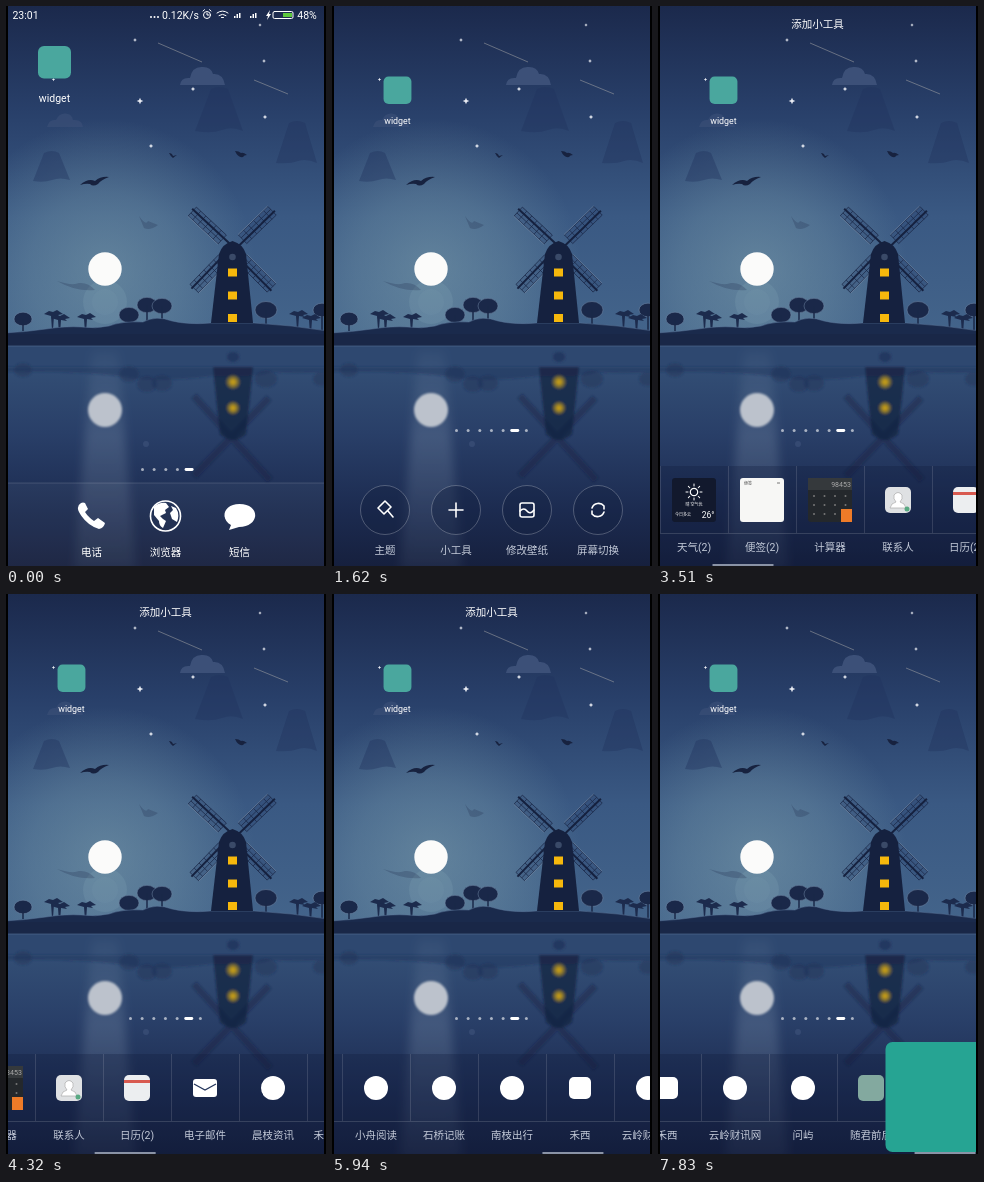
Animation, 320 px wide and 560 px high, one loop 8000 ms. Source, as an HTML page:

```html
<!DOCTYPE html>
<html lang="zh">
<head>
<meta charset="utf-8">
<style>
html, body { margin: 0; width: 100%; height: 100%; overflow: hidden; background: #000 }
svg { display: block; width: 320px; height: 560px }
text { font: 10.5px Roboto, "Noto Sans CJK SC", "Noto Sans CJK", sans-serif; fill: #fff; text-anchor: middle }
.line { fill: none; stroke: #fff; stroke-width: 1.6; stroke-linecap: round; stroke-linejoin: round }
.dim text { fill: #c3cad8 }
</style>
</head>
<body>
<svg viewBox="0 0 320 560">
<defs>
  <linearGradient id="sky" x2="0" y2="1">
    <stop offset="0" stop-color="#1b294c"/><stop offset=".3" stop-color="#283f69"/>
    <stop offset=".62" stop-color="#3a5983"/><stop offset="1" stop-color="#44658b"/>
  </linearGradient>
  <radialGradient id="glow">
    <stop offset="0" stop-color="#86a8b2" stop-opacity=".5"/><stop offset=".5" stop-color="#7fa2b0" stop-opacity=".32"/>
    <stop offset="1" stop-color="#7fa2b0" stop-opacity="0"/>
  </radialGradient>
  <linearGradient id="water" x2="0" y2="1">
    <stop offset="0" stop-color="#365379"/><stop offset=".4" stop-color="#293f68"/>
    <stop offset=".75" stop-color="#1c2b50"/><stop offset="1" stop-color="#16203e"/>
  </linearGradient>
  <linearGradient id="beam" x2="0" y2="1">
    <stop offset="0" stop-color="#8fa3bb" stop-opacity=".06"/><stop offset=".4" stop-color="#8fa3bb" stop-opacity=".25"/>
    <stop offset="1" stop-color="#8fa3bb" stop-opacity=".08"/>
  </linearGradient>
  <radialGradient id="lamp">
    <stop offset=".25" stop-color="#c09a1c"/><stop offset="1" stop-color="#a68a2c" stop-opacity=".3"/>
  </radialGradient>
  <filter id="soft" x="-30%" y="-30%" width="160%" height="160%"><feGaussianBlur stdDeviation="1.2"/></filter>
  <filter id="blur" x="-30%" y="-30%" width="160%" height="160%"><feGaussianBlur stdDeviation="5"/></filter>
  <clipPath id="stage"><path d="M2 0H318V560H2z"/></clipPath>
</defs>
<g clip-path="url(#stage)">
  <path fill="url(#sky)" d="M0 0H320V340H0z"/>
  <circle cx="99" cy="263" r="150" fill="url(#glow)"/>
  <g fill="#86a8b8"><circle cx="99" cy="296" r="22" opacity=".2"/><circle cx="99" cy="296" r="13" opacity=".1"/></g>
  <g fill="#21335e" opacity=".4">
    <path d="M205 83Q213 79 222 83L237 125Q226 120 216 124T189 125z"/>
    <path d="M283 117Q291 113 299 117L311 157Q300 152 292 155T270 157z"/>
    <path d="M38 147Q46 143 53 147L64 174Q54 171 46 174T27 175z"/>
  </g>
  <g fill="#3c5078">
    <path d="M174 79Q175 71 184 72Q186 60 197 61Q205 61 207 68Q217 67 219 79z"/>
    <path opacity=".6" d="M41 121Q43 113 50 114Q54 106 62 108Q66 109 67 114Q76 113 77 121z"/>
  </g>
  <path stroke="#a9a9a9" stroke-width=".8" opacity=".65" d="M152 37L196 56M248 74L282 88"/>
  <g id="stars" fill="#e8ebf2"></g>
  <g fill="#17223f">
    <path d="M74 179Q82 172 89 175Q95 170 103 171Q95 174 92 178Q87 181 84 178Q80 177 74 179z"/>
    <path d="M229 145Q233 145 235 147Q237 146 241 149Q238 149 237 151Q232 152 229 145z"/>
    <path d="M163 147Q166 147 167 150L171 149Q168 151 167 152Q165 151 163 147z"/>
    <path opacity=".22" d="M51 275Q66 280 73 277Q82 276 89 284Q70 286 51 275zM133 210Q140 220 142 215L152 219Q144 225 138 222z"/>
  </g>
  <circle cx="99" cy="263" r="16.7" fill="#fbfbfa"/>

  <path fill="url(#water)" d="M0 339H320V560H0z"/>
  <path fill="#2e4870" d="M0 339H320V361H0z"/>
  <path fill="url(#beam)" d="M86 345H112L130 565H68z" filter="url(#blur)"/>
  <g id="mirror" filter="url(#soft)">
    <path fill="#1f3157" opacity=".4" d="M0 361H320V366Q292 368 265 366Q250 372 205 370Q150 377 120 371Q80 365 0 366z"/>
  </g>
  <circle cx="99" cy="404" r="17" fill="#bcc2cc" filter="url(#soft)"/>
  <circle cx="140" cy="438" r="3" fill="#4a5f88" opacity=".4"/>

  <g id="trees"></g>
  <path fill="#1a2a4c" stroke="#5b7498" stroke-width=".5" d="M-2 340V327Q20 326 40 323Q60 320 75 321Q90 323 103 320Q116 315 137 316Q150 309 166 315Q183 319 205 317H248Q285 319 322 325V340z"/>
  <path fill="#17233f" d="M0 328H320V339H0z" opacity=".4"/>
  <g id="blades"></g>
  <path fill="#15213f" d="M205 317L213 248Q216 238 226.500 235Q237 238 240 248L247 317z"/>
  <circle cx="226.500" cy="251" r="3.300" fill="#3a4a68"/>
  <g fill="#f6b80c"><path d="M222 262.500h9v8h-9zM222 285.500h9v8h-9zM222 308h9v8h-9z"/></g>

  <g id="app">
    <rect x="32" y="40" width="33" height="32.500" rx="6" fill="#4aa79e"/>
    <text x="48.500" y="96">widget</text>
  </g>
  <g id="dots" fill="#fff"></g>

  <g id="home">
    <path fill="#fff" opacity=".04" d="M0 477H320V560H0z"/>
    <path stroke="#fff" stroke-width=".7" opacity=".2" d="M0 477H320"/>
    <g id="status">
      <text x="19.500" y="12.500">23:01</text><text x="174.500" y="12.500">0.12K/s</text><text x="301" y="12.500">48%</text>
      <g fill="#fff"><circle cx="145" cy="11" r="1"/><circle cx="148.500" cy="11" r="1"/><circle cx="152" cy="11" r="1"/>
        <path d="M228 12v-2h1.500v2zM230.500 12v-4H232v4zM233 12v-5h1.500v5zM244 12v-2h1.500v2zM246.500 12v-4H248v4zM249 12v-5h1.500v5zM264 4l-4 6h2l-1 4 4-6h-2z"/></g>
      <g class="line" style="stroke-width:1"><circle cx="201" cy="9" r="3.500"/><path d="M201 7v2h2M197 5l1.500-1.300M205 5l-1.500-1.300M211 7q5.500-4 11 0M213 9.500q3.500-2.500 7 0M215.500 11.500h2"/><rect x="267" y="5.500" width="20" height="7" rx="1.500"/></g>
      <path fill="#5cc83c" d="M277 7h9v4h-9z"/>
    </g>
    <path fill="#fff" d="M75 497Q70 500 73 506Q80 519 93 523Q98 522 99 517L92 512L88 515Q82 511 79 506L82 503L79 497Q77 496 75 497z"/>
    <circle cx="159.500" cy="510" r="15" class="line"/>
    <path fill="#fff" d="M148 501Q153 496 160 497L163 501L159 504L160 507L154 510L157 513L160 515L157 522Q153 520 153 515L148 509zM165 500L170 502Q174 508 171 516L166 513L164 507L167 504z"/>
    <path fill="#fff" d="M233.500 498C255 498 254 521 233 521L223 524L225 519C214 513 217 498 233.500 498z"/>
    <text x="85.500" y="550">电话</text><text x="159.500" y="550">浏览器</text><text x="233.500" y="550">短信</text>
  </g>

  <g id="edit" class="dim">
    <g id="rings" fill="#14204060" stroke="#fff" stroke-opacity=".3" stroke-width=".8"></g>
    <g class="line">
      <path d="M46 502L53 495L59 501L52 508zM56 505L61 511M124 497v14M117 504h14"/>
      <rect x="188" y="497" width="14" height="14" rx="2"/><path d="M188 505q4-4 7 0t7-1"/>
      <path d="M260 502A7 7 0 0 1 272 500M272 506A7 7 0 0 1 260 508M272 500v3M260 508v-3"/>
    </g>
    <text x="53" y="548">主题</text><text x="124" y="548">小工具</text><text x="195" y="548">修改壁纸</text><text x="266" y="548">屏幕切换</text>
  </g>

  <g id="panel">
    <path fill="#101c3c" opacity=".28" d="M0 460H320V560H0z"/>
    <g id="list" class="dim"></g>
    <path stroke="#fff" stroke-width=".7" opacity=".2" d="M0 527.500H320"/>
    <rect id="bar" y="558" width="61" height="2" fill="#8a93a6"/>
  </g>
  <text id="title" x="159.500" y="22" font-weight="500">添加小工具</text>
  <rect id="held" x="-55" y="-55" width="110" height="110" rx="7" fill="#26a493"/>
</g>
</svg>
<script>
const $ = id => document.getElementById(id);
const add = (id, html) => $(id).insertAdjacentHTML('beforeend', html);
const clamp = x => Math.max(0, Math.min(1, x));
const ease = (t, from, to) => { const x = clamp((t - from) / (to - from)); return x * x * (3 - 2 * x); };

// Scenery
for (const [x, y, r] of [[129,34,2], [134,95,3.3], [187,83,2.2], [145,140,2.2], [254,19,1.7], [258,55,2], [259,111,2.2], [47.5,73.5,1.8]])
  add('stars', `<path d="M${x} ${y - r}l${r * .3} ${r * .7} ${r * .7} ${r * .3} ${-r * .7} ${r * .3} ${-r * .3} ${r * .7} ${-r * .3} ${-r * .7} ${-r * .7} ${-r * .3} ${r * .7} ${-r * .3}z"/>`);

for (const [x, y, r] of [[123,309,9], [141,299,9], [156,300,9], [260,304,10], [17,313,8], [316,304,8]]) {
  const crown = cy => `<ellipse cx="${x}" cy="${cy}" rx="${r + 1}" ry="${r * .85}"/>`;
  add('trees', `<g fill="#1a2849" stroke="#7289a6" stroke-width=".5">${crown(y)}<path stroke="#1a2849" stroke-width="1.5" d="M${x} ${y}V325"/></g>`);
  add('mirror', `<g fill="#1f3157" opacity=".45">${crown(677 - y)}</g>`);
}
for (const [x, y] of [[47,308], [80,311], [292,308], [305,312], [54,312]])
  add('trees', `<path fill="#1c2b4d" d="M${x - 9} ${y}l5-3 4 1 4-2 6 4-5 1 2 2-6-1-1 14h-1l-1-14z"/>`);

const blade = a => {
  let d = 'M14-6H55V6H14zM14-2H55';
  for (let x = 21; x < 55; x += 7) d += `M${x}-6V6`;
  return `<g transform="translate(226.500 243) rotate(${a})"><path fill="#263a63" fill-opacity=".2" stroke="#1a2746" stroke-width=".7" d="${d}"/><path stroke="#15213f" stroke-width="2" d="M0 2H57"/><path stroke="#8296b0" stroke-width=".5" d="M14-6.500H55"/></g>`;
};
for (const a of [-44, 45, 134, 223]) add('blades', blade(a));
add('mirror', `<path fill="#15213f" opacity=".7" d="M207 361H247L240 428Q227 440 214 428z"/>
  <path stroke="#15213f" stroke-width="7" opacity=".35" d="M188 390L264 474M263 392L188 470"/>
  <ellipse cx="227" cy="351" rx="6" ry="5" fill="#243860"/>
  <circle cx="227" cy="376" r="7" fill="url(#lamp)"/><circle cx="227" cy="402" r="6.500" fill="url(#lamp)"/>`);
for (const x of [53, 124, 195, 266]) add('rings', `<circle cx="${x}" cy="504" r="24.500"/>`);

// Widget list; each icon is drawn around its own centre
const tile = (w, fill, more = '') => `<rect x="${-w / 2}" y="${-w / 2}" width="${w}" height="${w}" rx="${w > 30 ? 3 : 5}" fill="${fill}"/>` + more;
const label = (x, y, size, s, fill = '#fff') => `<text x="${x}" y="${y}" style="font-size:${size}px;fill:${fill}">${s}</text>`;
const stroke = (d, w = 1.6) => `<path class="line" style="stroke-width:${w}" d="${d}"/>`;
const disc = '<circle r="12" fill="#fff"/>';
const glass = '#7f8798';
let keys = '';
for (let i = 0; i < 12; i++) keys += `<circle cx="${-16 + i % 4 * 10.5}" cy="${-4 + (i >> 2) * 9}" r="1" fill="#777"/>`;
const rays = [...Array(8)].map((_, i) => `<path class="line" style="stroke-width:1" transform="rotate(${i * 45})" d="M6 0h2"/>`).join('');

const items = [
  ['开关(18)', tile(26, glass, '<path fill="#fff" d="M0-7L1.500-2L7 1V3L1.500 1L1 5L3 7H-3L-1 5L-1.500 1L-7 3V1L-1.500-2z"/>')],
  ['设置(12)', tile(26, glass, stroke('M-8-2Q0-9 8-2M-5 1Q0-4 5 1M-2.500 4Q0 2 2.500 4M0 6v.1'))],
  ['一键清理', tile(39, '#626b80', '<circle r="13" fill="#4c5a6c" stroke="#8fae9e"/>' + stroke('M-4-4L4 4M4-4L-4 4', 1.3))],
  ['时钟(4)', '<rect x="-20" y="-15" width="41" height="30" fill="#17223f"/><text y="6" style="font-size:18px;font-weight:300;fill:#7d879b">2:36</text>'],
  ['天气(2)', tile(44, '#12192d', `<g transform="translate(0 -8)"><circle r="3.700" class="line" style="stroke-width:1.200"/>${rays}</g>` + label(0, 6, 4, '晴 空气优') + label(-11, 16, 4, '今日多云') + label(14, 18, 8.5, '26°'))],
  ['便签(2)', tile(44, '#f7f7f5', label(-14, -15, 4, '便签', '#555') + '<path stroke="#777" d="M15-17h3"/>')],
  ['计算器', tile(44, '#24282c', keys + '<path fill="#35393c" d="M-22-22H22V-10H-22z"/><path fill="#ee7b28" d="M11 9H22V22H11z"/>' + label(11, -13, 7, '98453', '#aaa'))],
  ['联系人', tile(26, '#dfe1e3', '<path fill="#fff" stroke="#aaa" stroke-width=".7" d="M-8 8Q-7 3-2 2Q-5-1-4-5Q0-10 4-5Q5-1 2 2Q7 3 8 8z"/><circle cx="9" cy="9" r="2.500" fill="#58a982"/>')],
  ['日历(2)', tile(26, '#eceef0', '<path fill="#d85a50" d="M-13-8H13V-5H-13z"/>')],
  ['电子邮件', '<rect x="-12" y="-9" width="24" height="18" rx="3" fill="#fff"/><path fill="none" stroke="#25365c" stroke-width="1.300" d="M-11-4L0 2L11-4"/>'],
  ['晨枝资讯', disc], ['禾叶清单(7)', disc], ['青岚词册(2)', ''], ['微岚', ''],
  ['云栈音台', disc], ['木棉日记', disc], ['小舟阅读', disc], ['石桥记账', disc], ['南枝出行', disc],
  ['禾西', tile(22, '#fff')], ['云岭财讯网', disc], ['问屿', disc],
  ['随君前后', tile(26, '#83a99f')], ['widget', tile(26, '#43aa9c')]
];
items.forEach(([name, icon], i) => {
  const x = 36 + 68 * i;
  add('list', `<path stroke="#fff" stroke-width=".7" opacity=".18" d="M${x + 34.500} 460V527"/>
    <g transform="translate(${x} 494)">${icon}</g><text x="${x}" y="545">${name}</text>`);
});

// Time in ms and list offset
const stops = [[2700, 0], [3510, 272], [3780, 290], [4860, 608], [5130, 630], [5940, 1080], [6750, 1341], [7290, 1319], [8000, 1319]];
function offset(t) {
  const i = stops.findIndex(s => t <= s[0]);
  if (i < 1) return 0;
  const [[t0, a], [t1, b]] = [stops[i - 1], stops[i]];
  return a + (b - a) * (t - t0) / (t1 - t0);
}

function dots(e) {
  const n = e < .5 ? 5 : 7, x0 = n === 5 ? 136.500 : 124.500, y = 463.5 - 39 * e;
  let html = '';
  for (let i = 0; i < n; i++) {
    const x = x0 + i * 11.65, on = i === n - (n === 5 ? 1 : 2);
    html += on ? `<rect x="${x - 4.5}" y="${y - 1.4}" width="9" height="2.800" rx="1.400"/>` : `<circle cx="${x}" cy="${y}" r="1.500" opacity=".6"/>`;
  }
  $('dots').innerHTML = html;
}

function draw(now) {
  const t = Math.floor(now % 8000 / 270) * 270;
  const e = ease(t, 540, 1350), p = ease(t, 1890, 2500), s = offset(t), held = t > 7600;
  $('app').setAttribute('transform', `translate(${24.5 * e} ${36.7 * e}) scale(${1 - .155 * e})`);
  $('home').setAttribute('opacity', clamp(1 - 2 * e));
  $('edit').setAttribute('opacity', clamp(2 * e - 1) * (1 - p));
  $('edit').setAttribute('transform', `translate(0 ${30 * (1 - e)})`);
  $('panel').setAttribute('opacity', p);
  $('panel').setAttribute('transform', `translate(0 ${100 * (1 - p)})`);
  $('title').setAttribute('opacity', held ? 0 : p);
  $('list').setAttribute('transform', `translate(${-s} 0)`);
  $('bar').setAttribute('x', 2 + s * .193);
  $('held').setAttribute('transform', 'translate(282.5 503)');
  $('held').setAttribute('visibility', held ? 'visible' : 'hidden');
  dots(e);
}
const start = performance.now();
function tick() {
  draw(performance.now() - start);
  requestAnimationFrame(tick);
}
tick();
</script>
</body>
</html>
```
